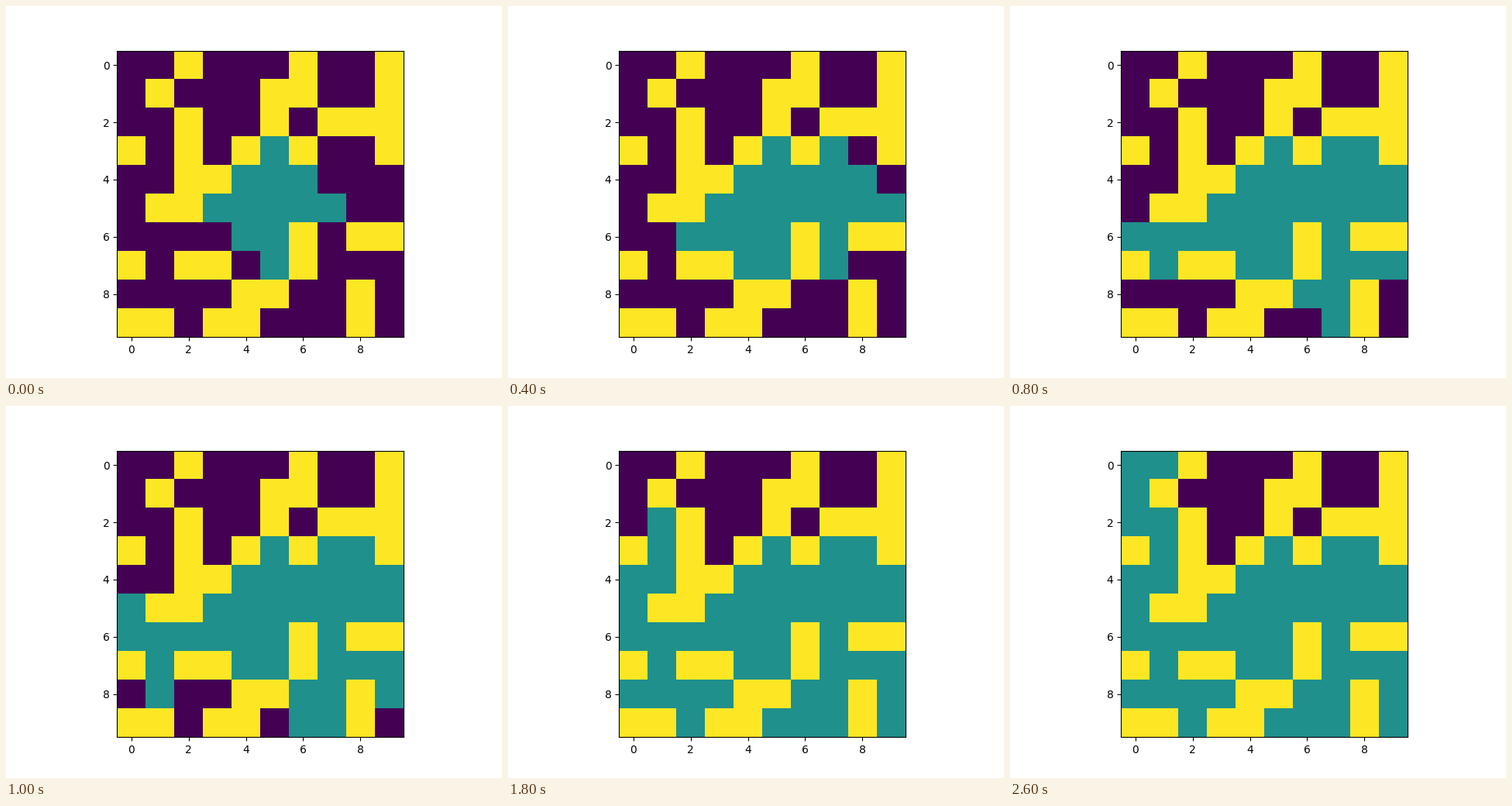
A matplotlib script for the animation above (8 s loop, 640 by 480 pixels).

```python
import numpy as np
import matplotlib.pyplot as plt
from matplotlib.animation import FuncAnimation

MAZE = """
..#...#..#
.#...##..#
..#..#.###
#.#.#.#..#
..##......
.##.......
......#.##
#.##..#...
....##..#.
##.##...#.
""".split()
START = (5, 5)
FIRST_STEP = 2
FRAMES, INTERVAL = 40, 200
EMPTY, WATER, WALL = 0, 1, 2

walls = np.array([[c == "#" for c in row] for row in MAZE])


def flood_distance(walls, start):
    """Steps from start to each open cell, infinite where unreachable."""
    dist = np.full(walls.shape, np.inf)
    dist[start] = 0
    queue = [start]
    for r, c in queue:
        for cell in ((r - 1, c), (r + 1, c), (r, c - 1), (r, c + 1)):
            inside = all(0 <= i < n for i, n in zip(cell, walls.shape))
            if inside and not walls[cell] and np.isinf(dist[cell]):
                dist[cell] = dist[r, c] + 1
                queue.append(cell)
    return dist


distance = flood_distance(walls, START)


def grid_at(frame):
    grid = np.where(walls, WALL, EMPTY)
    grid[distance <= frame + FIRST_STEP] = WATER
    return grid


fig, ax = plt.subplots(figsize=(6.4, 4.8), dpi=100)
image = ax.imshow(grid_at(0), cmap="viridis", vmin=EMPTY, vmax=WALL,
                  interpolation="nearest")
ax.set_xticks(range(0, 10, 2))
ax.set_yticks(range(0, 10, 2))


def update(frame):
    image.set_data(grid_at(frame))
    return [image]


anim = FuncAnimation(fig, update, frames=FRAMES, interval=INTERVAL,
                     repeat=True, repeat_delay=0)
plt.show()
```
